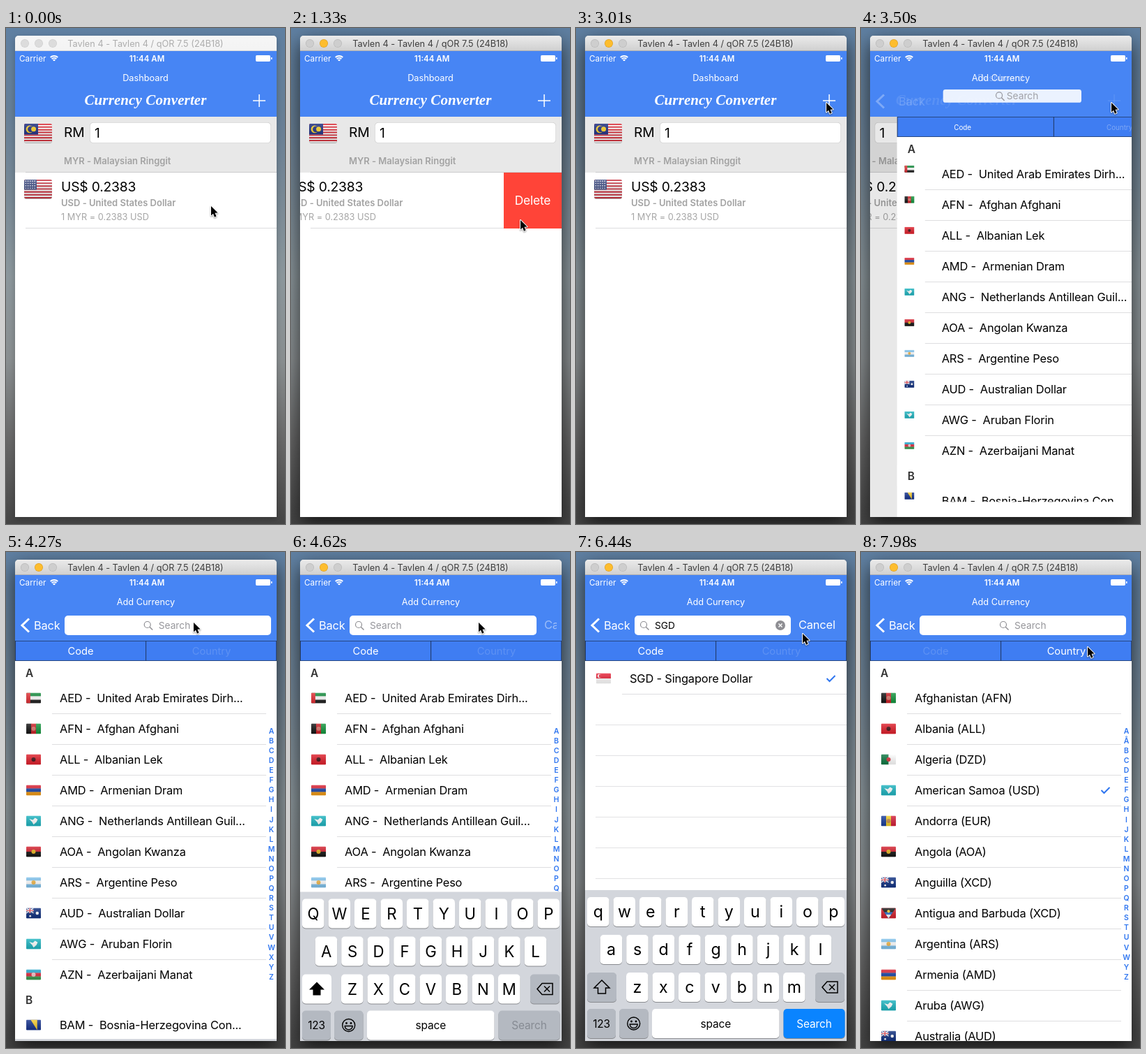
An HTML page with a canvas that plays this animation: 400x710 px, repeating every 8000 ms.

```html
<!DOCTYPE html>
<html lang="en">
<head>
<meta charset="utf-8">
<title>Currency app demo</title>
<style>
html, body { margin: 0; width: 100%; height: 100%; overflow: hidden; background: #555 }
canvas { display: block }
</style>
</head>
<body>
<canvas width="400" height="710"></canvas>
<script>
const g = document.querySelector('canvas').getContext('2d');
const LOOP = 8000, STEP = 70, BLUE = '#4785f4', LINK = '#2f76f0';

// ---- timing ----
const clamp = x => Math.max(0, Math.min(1, x));
const lerp = (a, b, k) => a + (b - a) * k;
const ease = (t, a, b) => { const x = clamp((t - a) / (b - a)); return x * x * (3 - 2 * x); };
const spring = (t, start, w) => {
  const x = Math.max(0, t - start) / 1000 * w;
  return 1 - (1 + x) * Math.exp(-x);
};

// ---- drawing helpers ----
function box(x, y, w, h, color, r = 0) {
  g.fillStyle = color;
  g.beginPath();
  g.roundRect(x, y, w, h, r);
  g.fill();
}
function disc(x, y, r, color) {
  g.fillStyle = color;
  g.beginPath();
  g.arc(x, y, r, 0, 7);
  g.fill();
}
function trace(pts, close) {
  g.beginPath();
  for (let i = 0; i < pts.length; i += 2) g.lineTo(pts[i], pts[i + 1]);
  if (close) g.closePath();
}
function poly(pts, color) { trace(pts); g.fillStyle = color; g.fill(); }
function stroke(pts, color, width, close) {
  trace(pts, close);
  g.strokeStyle = color;
  g.lineWidth = width;
  g.stroke();
}
function ring(x, y, r, a, b, color, width) {
  g.beginPath();
  g.arc(x, y, r, a, b);
  g.strokeStyle = color;
  g.lineWidth = width;
  g.stroke();
}
// y is the middle of the capitals
function text(s, x, y, size, color, weight = 400, align = 'left') {
  const px = size * (size > 15 ? .965 : weight > 400 ? 1 : .98);
  g.font = `${weight} ${px}px Inter, sans-serif`;
  g.letterSpacing = size > 15 ? -.01 * size + 'px' : '0px';
  g.textAlign = align;
  g.fillStyle = color;
  g.fillText(s, x, y + px * .363);
}
const mid = (s, x, y, size, color, weight) => text(s, x, y, size, color, weight, 'center');
function layer(draw, { alpha = 1, dx = 0, clip } = {}) {
  g.save();
  if (clip) { g.beginPath(); g.rect(...clip); g.clip(); }
  g.globalAlpha *= clamp(alpha);
  g.translate(dx, 0);
  draw();
  g.restore();
}

// ---- flags: stripe direction, colours, emblem, emblem colour ----
const FLAGS = {
  AE: ['h', '#138a3c #fff #222', 'left', '#e22f35'],
  AF: ['v', '#151515 #cc2127 #14963f', 'dot', '#d9776c'],
  AL: ['h', '#e0202c', 'dot', '#401015'],
  AM: ['h', '#d92032 #1544a8 #f29a13'],
  AN: ['h', '#1fb5c1', 'map', '#fff'],
  AO: ['h', '#d5202e #161616', 'dot', '#e8b51d'],
  AR: ['h', '#80c2ec #fff #80c2ec', 'dot', '#f0b64a'],
  AU: ['h', '#10307f', 'jack', '#fff'],
  AZ: ['h', '#23a4ca #df2439 #3c9b50', 'dot', '#f2c4c8'],
  BA: ['h', '#16338e', 'wedge', '#f5cb2d'],
  SG: ['h', '#e8243a #fff', 'moon', '#fff'],
  DZ: ['v', '#0f7843 #fff', 'dot', '#d9303c'],
  AD: ['v', '#1a3e9c #f3cd26 #d5203a', 'dot', '#c58a4a'],
  AI: ['h', '#123384', 'jack', '#fff'],
  AG: ['h', '#d4202d', 'sun', '#161616'],
  MY: ['h', Array(7).fill('#d8232f #fff').join(' '), 'canton', '#f5cb1f'],
  US: ['h', Array(7).fill('#c9303e').join(' #fff '), 'stars', '#fff']
};
FLAGS.AW = FLAGS.AS = FLAGS.AN;

const EMBLEMS = {
  dot: (w, h, c) => disc(w / 2, h / 2, h * .2, c),
  left: (w, h, c) => box(0, 0, w * .28, h, c),
  map: (w, h, c) => poly([.2, .3, .45, .4, .6, .2, .78, .35, .7, .6, .5, .85, .4, .6].map((v, i) => v * (i % 2 ? h : w)), c),
  wedge: (w, h, c) => poly([w * .3, 0, w * .75, 0, w * .75, h], c),
  moon: (w, h, c) => { disc(w * .22, h * .27, h * .18, c); disc(w * .28, h * .27, h * .15, '#e8243a'); },
  sun(w, h, c) {
    poly([0, 0, w, 0, w / 2, h], c);
    poly([w * .2, h * .4, w * .8, h * .4, w / 2, h], '#2d74d0');
    poly([w * .32, h * .64, w * .68, h * .64, w / 2, h], '#fff');
    disc(w / 2, h * .32, h * .14, '#f4cb2a');
  },
  jack(w, h, c) {
    const a = w / 2, b = h / 2;
    stroke([0, 0, a, b], c, 1.2);
    stroke([a, 0, 0, b], c, 1.2);
    box(0, b / 2 - 1.2, a, 2.4, c);
    box(a / 2 - 1.2, 0, 2.4, b, c);
    box(0, b / 2 - .6, a, 1.2, '#d8232f');
    box(a / 2 - .6, 0, 1.2, b, '#d8232f');
    disc(w * .75, h * .5, h * .15, c);
    disc(w * .27, h * .78, h * .09, c);
  },
  canton(w, h, c) {
    box(0, 0, w * .5, h * .57, '#14257a');
    disc(w * .2, h * .29, h * .2, c);
    disc(w * .24, h * .29, h * .165, '#14257a');
    disc(w * .34, h * .29, h * .13, c);
  },
  stars(w, h, c) {
    box(0, 0, w * .45, h * .54, '#39477f');
    for (let i = 0; i < 20; i++) disc(w * (.06 + i % 5 * .08), h * (.08 + (i / 5 | 0) * .125), .8, c);
  }
};

function flag(key, x, y, w, h) {
  const [dir, list, emblem, tint] = FLAGS[key], colors = list.split(' '), n = colors.length;
  g.save();
  g.translate(x, y);
  if (w > 30) box(0, 1, w, h, '#0004', 3);
  g.beginPath();
  g.roundRect(0, 0, w, h, w * .06);
  g.clip();
  colors.forEach((c, i) => dir == 'h' ? box(0, h * i / n, w, h / n + .3, c) : box(w * i / n, 0, w / n + .3, h, c));
  if (emblem) EMBLEMS[emblem](w, h, tint);
  const gloss = g.createLinearGradient(0, 0, 0, h);
  gloss.addColorStop(0, '#fff3');
  gloss.addColorStop(1, '#0002');
  box(0, 0, w, h, gloss);
  g.restore();
}

// ---- data ----
const CODES = ['AED -  United Arab Emirates Dirh...', 'AFN -  Afghan Afghani', 'ALL -  Albanian Lek',
  'AMD -  Armenian Dram', 'ANG -  Netherlands Antillean Guil...', 'AOA -  Angolan Kwanza',
  'ARS -  Argentine Peso', 'AUD -  Australian Dollar', 'AWG -  Aruban Florin',
  'AZN -  Azerbaijani Manat', 'BAM -  Bosnia-Herzegovina Con...', 'SGD - Singapore Dollar'];
const COUNTRIES = ['AF Afghanistan (AFN)', 'AL Albania (ALL)', 'DZ Algeria (DZD)', 'AS American Samoa (USD)',
  'AD Andorra (EUR)', 'AO Angola (AOA)', 'AI Anguilla (XCD)', 'AG Antigua and Barbuda (XCD)',
  'AR Argentina (ARS)', 'AM Armenia (AMD)', 'AW Aruba (AWG)', 'AU Australia (AUD)'];
const POINTER = [[0, 294, 255], [70, 293, 256], [680, 293, 256], [980, 205, 262], [1050, 205, 262], [1330, 329, 275],
  [1500, 329, 275], [1960, 212, 421], [2450, 212, 421], [3000, 359, 107], [3580, 359, 107], [3920, 269, 101],
  [5400, 269, 101], [5880, 146, 184], [6230, 146, 184], [6440, 325, 117], [6720, 344, 100], [6900, 344, 100],
  [7420, 325, 136], [LOOP, 325, 136]];

// ---- parts ----
function desktop(t) {
  const sky = g.createLinearGradient(0, 0, 0, 710);
  ['#5f80a2', '#667f97', '#788996', '#8c979c', '#8a8f91', '#676767', '#454545']
    .forEach((c, i) => sky.addColorStop(i / 6, c));
  box(0, 0, 400, 710, sky);
  const active = ease(t, 280, 490), on = t >= 350;
  g.save();
  g.shadowColor = `rgba(0,0,0,${lerp(.25, .7, active)})`;
  g.shadowBlur = lerp(8, 28, active);
  g.shadowOffsetY = lerp(3, 10, active);
  box(13, 11, 375, 689, '#ddd', [5, 5, 0, 0]);
  g.restore();
  const bar = g.createLinearGradient(0, 11, 0, 33);
  bar.addColorStop(0, on ? '#ebebeb' : '#f6f6f6');
  bar.addColorStop(1, on ? '#cfcfcf' : '#f3f3f3');
  box(13, 11, 375, 22, bar, [5, 5, 0, 0]);
  box(13, 32, 375, 1, on ? '#b2b2b2' : '#dadada');
  [27, 47, 67].forEach((x, i) => {
    disc(x, 22, 6, on ? (i == 1 ? '#dfa023' : '#b9b9b9') : '#cfcfcf');
    disc(x, 22, 5.3, on ? (i == 1 ? '#fdbd2e' : '#cecece') : '#dcdcdc');
  });
  mid('Tavlen 4 - Tavlen 4 / qOR 7.5 (24B18)', 200, 22, 13, on ? '#3e3e3e' : '#adadad');
}

function statusBar() {
  text('Carrier', 19, 43.5, 12, '#fff');
  [2, 5, 8].forEach(r => ring(69, 48, r, -2.3, -.85, '#fff', 2));
  mid('11:44 AM', 202, 43.5, 11.5, '#fff', 600);
  box(358, 39, 21, 9, '#fff', 2);
  stroke([359, 39.5, 378, 39.5, 378, 47.5, 359, 47.5], '#fff8', 1, true);
  box(380, 42, 1.5, 3, '#fff');
}

function dashboard(swipe) {
  box(13, 127, 375, 573, '#fff');
  box(13, 127, 375, 80, '#e8e8e8');
  box(28, 206, 360, 1, '#cbcbcd');
  flag('MY', 26, 137, 40, 27);
  text('RM', 83, 149, 20, '#000');
  box(120, 135, 260, 30, '#d2d2d2', 5);
  box(120.7, 135.7, 258.6, 28.6, '#fff', 4.5);
  text('1', 127, 150, 20, '#000');
  text('MYR - Malaysian Ringgit', 83, 190, 13, '#a2a2a2', 600);
  box(28, 286, 360, 1, '#dcdcde');
  layer(() => {
    flag('US', 26, 217, 40, 27);
    text('US$ 0.2383', 79, 227, 20, '#000');
    text('USD - United States Dollar', 79, 250, 13, '#a2a2a2', 600);
    text('1 MYR = 0.2383 USD', 79, 270, 13, '#a6a6a6');
    box(388, 207, 83, 80, '#ff4438');
    mid('Delete', 429.5, 247, 18, '#fff');
  }, { dx: -swipe });
}

function alertBox(k, scale) {
  box(13, 33, 375, 667, `rgba(0,0,0,${.4 * k})`);
  layer(() => {
    g.translate(200, 366);
    g.scale(scale, scale);
    g.translate(-200, -366);
    box(65, 294, 270, 144, '#f8f8f8', 13);
    mid('Min 2 Currencies Selected', 200, 325, 17, '#000', 600);
    mid('Please add another currency before', 200, 350, 13, '#000');
    mid('removing this one.', 200, 366, 13, '#000');
    box(65, 394, 270, .7, '#c4c4c8');
    mid('Dismiss', 200, 417, 17, '#007aff', 600);
  }, { alpha: k });
}

function check(x, y) { stroke([x, y, x + 4, y + 4, x + 12, y - 4], LINK, 2); }

function row(key, label, y, s, right) {
  const top = y - 22;
  flag(key, 13 + 16 * s, top + 14.5 * s, 21 * s, 15 * s);
  text(label, 77, y, 17, '#000');
  const from = lerp(27, 66, s);
  box(from, y + 22, right - from, 1, '#dedee0');
}

function header(letter, y) {
  box(13, y - 16, 375, 30, '#fff');
  text(letter, 28, y, 16, '#333', 600);
}

function searchResults(t, query) {
  const tapped = t >= 6090 && t < 6160, q = query.toLowerCase();
  const hits = CODES.filter(s => s.toLowerCase().includes(q));
  if (tapped) box(13, 159, 375, 44, '#d9d9d9');
  hits.forEach((s, i) => row(s.slice(0, 2), s, 181 + 44 * i, 1, 388));
  for (let i = hits.length; i < 12; i++) box(28, 203 + 44 * i, 360, 1, '#e2e2e4');
  if (t >= 6160) check(359.5, 181);
}

function fullList(country, s) {
  (country ? COUNTRIES : CODES).forEach((v, i) => {
    const y = 209 + 44 * i + (!country && i > 9 ? 28 : 0);
    row(v.slice(0, 2), country ? v.slice(3) : v, y, s, 373);
  });
  header('A', 173);
  if (country) check(344.5, 341);
  else header('B', 641);
  [...(country ? 'AÅBCDEFGHIJKLMNOPQRSTUVWYZ' : 'ABCDEFGHIJKLMNOPQRSTUVWXYZ')]
    .forEach((c, i) => mid(c, 380.5, 256 + 14.08 * i, 10.5, LINK, 600));
}

function addPage(t, s, query) {
  box(13, 127, 375, 573, '#fff');
  layer(() => query ? searchResults(t, query) : fullList(t >= 7770, s),
    { clip: [13, 156, 375, lerp(478, 544, s)] });
  const w = lerp(600, 375, s), k = ease(t, 7700, 7930), size = 15 * s;
  box(13, 127, w, 29, '#20365f');
  box(14, 127.8, w / 2 - 1.4, 27.4, '#3f7df2');
  box(13.6 + w / 2, 127.8, w / 2 - 1.4, 27.4, '#3f7df2');
  const tab = (label, x, on) => layer(() => mid(label, x, 142, size, '#fff'), { alpha: lerp(.16, 1, on) });
  tab('Code', 107, 1 - k);
  tab('Country', lerp(408, 294.5, s), Math.max(k, .6 * (1 - s)));
}

function searchField(t, s, query) {
  const back = 1 - ease(t, 6880, 7200);
  const shrink = ease(t, 4450, 4850) * back, left = ease(t, 4250, 4560) * back;
  const x = lerp(186, 84, s), w = 296 * s - 72 * shrink, y = lerp(82, 91, s), h = 28 * s;
  const cx = x + w / 2, cy = y + h / 2, right = x + w;
  layer(() => {
    box(x, y, w, h, '#fff', 5 * s);
    const ix = lerp(cx - 28 * s, 97, left);
    ring(ix, cy - 1, 4.5, 0, 7, '#8e8e93', 1.2);
    stroke([ix + 3.2, cy + 2.2, ix + 7.5, cy + 6.5], '#8e8e93', 1.4);
    text(query || 'Search', lerp(cx - 12 * s, 113, left), cy, 14, query ? '#000' : '#96969b');
    if (query) {
      disc(right - 15, cy, 7, '#8e8e93');
      const a = right - 17.5, b = right - 12.5;
      stroke([a, cy - 2.5, b, cy + 2.5], '#fff', 1.4);
      stroke([b, cy - 2.5, a, cy + 2.5], '#fff', 1.4);
    }
  }, { alpha: s + .22 });
  layer(() => text('Cancel', right + 11, 104.5, 17, '#fff'),
    { alpha: shrink * 1.2, clip: [13, 88, 368, 34] });
}

function navBar(t, p, s, query) {
  box(13, 33, 375, 94, BLUE);
  statusBar();
  const leaving = { alpha: p ? (1 - s) * .3 : 1 };
  layer(() => mid('Dashboard', 200, 71, 13, '#fff'), { alpha: 1 - s });
  layer(() => {
    g.font = 'italic 700 21px "Liberation Serif", serif';
    g.letterSpacing = '.1px';
    g.textAlign = 'center';
    g.fillStyle = '#fff';
    g.fillText('Currency Converter', 200, 110);
  }, { ...leaving, dx: -70 * p });
  layer(() => {
    box(354, 103.3, 18, 1.5, '#fff');
    box(362.3, 95, 1.5, 18, '#fff');
  }, leaving);
  if (!p) return;
  layer(() => mid('Add Currency', 200.5, 71, 13, '#fff'), { alpha: ease(t, 3150, 3550) });
  layer(() => stroke([33, 95.5, 23, 105, 33, 114.5], '#fff', 3), { alpha: s ** 3 });
  layer(() => text('Back', 40, 105, 17, '#fff'), { alpha: s ** 4, dx: 135 * (1 - p) });
  searchField(t, s, query);
}

function key(x, y, w, label, size = 16, fill = '#fff', color = '#000') {
  box(x, y + 1, w, 42, '#898b8f', 5);
  box(x, y, w, 42, fill, 5);
  if (label) mid(label, x + w / 2, y + 21, size, color);
}

function keyboard(top, query) {
  const gray = '#b4b9c1';
  box(13, top, 375, 216, '#d3d6dc');
  ['QWERTYUIOP', 'ASDFGHJKL', 'ZXCVBNM'].forEach((letters, r) => [...letters].forEach((c, i) =>
    key([16, 34.7, 72][r] + 37.5 * i, top + 10 + 54 * r, 31.5, query ? c.toLowerCase() : c, query ? 24 : 23)));
  const y = top + 118, cy = y + 21, by = top + 170;
  key(16, y, 42, '', 0, query ? gray : '#fff');
  const arrow = [37, cy - 10, 48, cy + 1, 42.5, cy + 1, 42.5, cy + 9, 31.5, cy + 9, 31.5, cy + 1, 26, cy + 1];
  if (query) stroke(arrow, '#000', 1.5, true);
  else poly(arrow, '#000');
  key(343, y, 42, '', 0, gray);
  stroke([353, cy, 360, cy - 8, 375, cy - 8, 375, cy + 8, 360, cy + 8], '#000', 1.5, true);
  stroke([363, cy - 4, 371, cy + 4], '#000', 1.5);
  stroke([371, cy - 4, 363, cy + 4], '#000', 1.5);
  key(16, by, 41, '123', 16, gray);
  key(62, by, 41.5, '', 0, gray);
  const fy = by + 21;
  ring(82.7, fy, 9, 0, 7, '#000', 1.4);
  disc(79.5, fy - 3, 1.4, '#000');
  disc(86, fy - 3, 1.4, '#000');
  g.beginPath();
  g.arc(82.7, fy + 1, 5.5, 0, Math.PI);
  g.closePath();
  g.stroke();
  key(109, by, 182.5, 'space');
  key(297.5, by, 88, 'Search', 16, query ? '#0a84ff' : gray, query ? '#fff' : '#868b93');
}

function pointer(t) {
  const i = POINTER.findIndex(p => p[0] > t), [t0, x0, y0] = POINTER[i - 1], [t1, x1, y1] = POINTER[i];
  const k = ease(t, t0, t1);
  g.save();
  g.translate(lerp(x0, x1, k), lerp(y0, y1, k));
  g.lineJoin = 'round';
  const shape = [0, 0, 0, 13.5, 3, 10.8, 5, 15.7, 7.6, 14.6, 5.5, 9.8, 9.6, 9.6];
  g.shadowColor = '#0006';
  g.shadowBlur = 2;
  g.shadowOffsetY = 1;
  stroke(shape, '#fff', 2, true);
  g.shadowColor = 'transparent';
  poly(shape, '#000');
  g.restore();
}

function frame(t) {
  const p = spring(t, 3140, 10.7), s = ease(t, 3140, 3725);
  const query = t < 4830 || t >= 6930 ? '' : t < 4970 ? 'S' : t < 5180 ? 'SG' : 'SGD';
  desktop(t);
  layer(() => {
    if (p < .999) {
      const swipe = 83 * ease(t, 660, 1080) * (1 - ease(t, 2450, 2800));
      layer(() => dashboard(swipe), { dx: -112 * p });
      box(13, 127, 375, 573, `rgba(0,0,0,${.1 * p})`);
    }
    if (p) layer(() => addPage(t, s, query), { dx: 375 * (1 - p) });
    navBar(t, p, s, query);
    const up = spring(t, 4260, 18) * (1 - spring(t, 6880, 18));
    if (up > .001) keyboard(484 + 216 * (1 - up), query);
    const shown = ease(t, 1350, 1540), k = shown * (1 - ease(t, 2270, 2450));
    if (k) alertBox(k, lerp(1.15, 1, shown));
  }, { clip: [13, 33, 375, 667] });
  pointer(t);
}

function tick() {
  const t = performance.now() % LOOP;
  frame(Math.floor(t / STEP) * STEP);
  requestAnimationFrame(tick);
}
tick();
</script>
</body>
</html>
```
